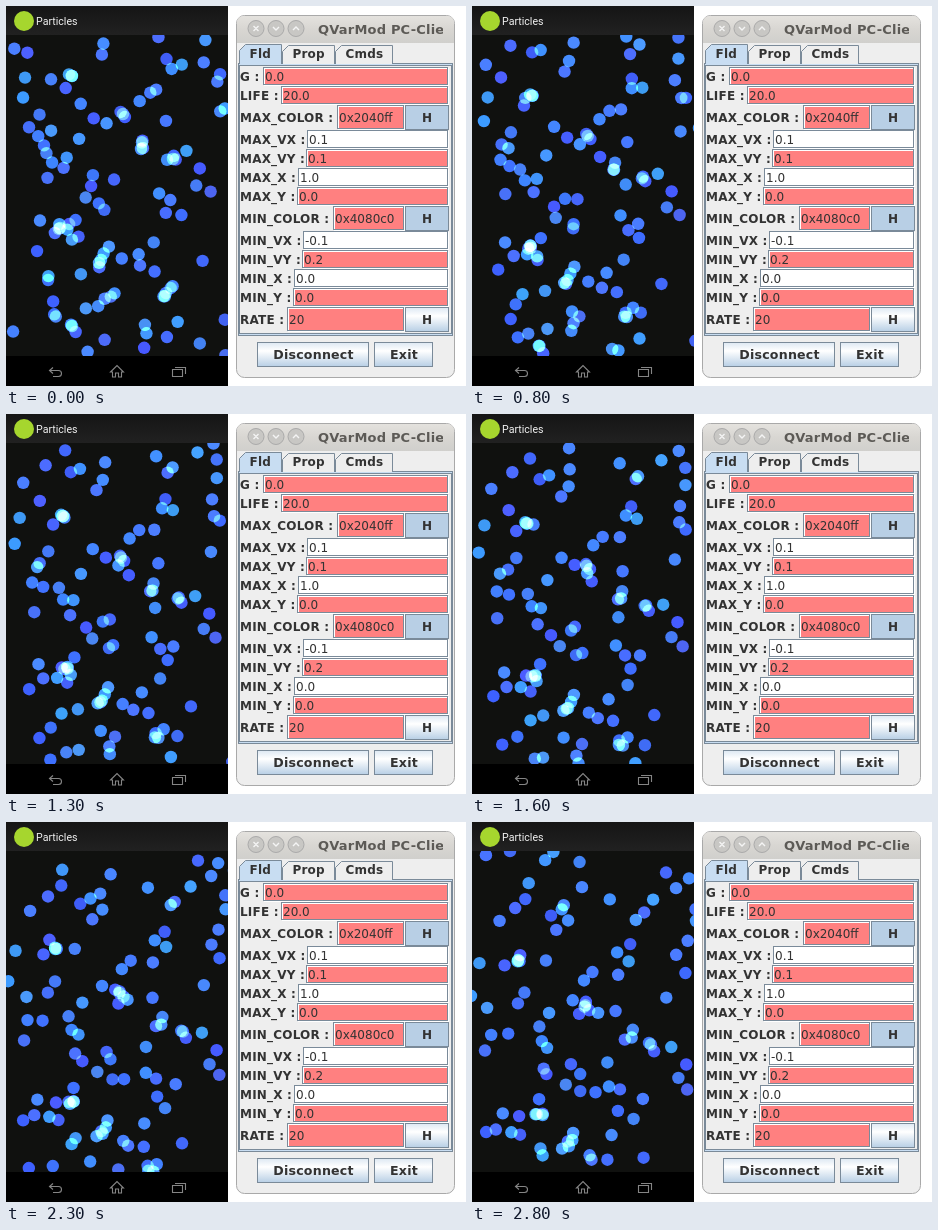
Recreate the animation shown at these times as an HTML page with a canvas. Size 460x380 px, loop 2.9 s.

```html
<!DOCTYPE html>
<html lang="en">
<head>
<meta charset="utf-8">
<title>Particles</title>
<style>
  html, body { margin: 0; width: 460px; height: 380px; overflow: hidden; background: #fff; }
  svg, canvas { position: absolute; left: 0; top: 0; display: block; }
  text { font-family: "DejaVu Sans", sans-serif; font-size: 12px; fill: #333; }
  .b { font-weight: bold; letter-spacing: .2px; }
  .push { font-size: 12.6px; }
</style>
</head>
<body>
<svg id="ui" width="460" height="380" viewBox="0 0 460 380">
  <defs>
    <linearGradient id="head" x2="0" y2="1">
      <stop offset="0" stop-color="#151515"/><stop offset="1" stop-color="#212121"/>
    </linearGradient>
    <linearGradient id="bar" x2="0" y2="1">
      <stop offset="0" stop-color="#e4e2de"/><stop offset=".5" stop-color="#d8d6d2"/><stop offset="1" stop-color="#d0cfcc"/>
    </linearGradient>
    <linearGradient id="btn" x2="0" y2="1">
      <stop offset="0" stop-color="#dde8f3"/><stop offset=".35" stop-color="#fff"/><stop offset="1" stop-color="#b8cfe5"/>
    </linearGradient>
    <clipPath id="cap"><rect x="300" y="10" width="137" height="26"/></clipPath>
  </defs>

  <rect width="222" height="380"/>
  <rect width="222" height="29" fill="url(#head)"/>
  <circle cx="18" cy="15" r="10" fill="#a6d62e"/>
  <text x="30" y="19" style="font-family:Roboto,sans-serif;font-size:10.6px;fill:#f2f2f2">Particles</text>
  <g fill="none" stroke="#858585" stroke-width="1.1">
    <path d="M47 361.5 L43.5 364.5 L47 367.5 M43.5 364.5 H52.5 Q55.5 364.5 55.5 367.5 T52.5 370.5 H47"/>
    <path d="M104.5 366 L111 359.5 L117.5 366 H115.5 V371 H112.5 V367 H109.5 V371 H106.5 V366 Z"/>
    <path d="M166.5 363.5 H176.5 V370.5 H166.5 Z M169 361.5 H179.5 V368"/>
  </g>

  <rect x="230.5" y="9.5" width="218" height="362" rx="8" fill="#eee" stroke="#a9a9a9"/>
  <path d="M231 37 V17 Q231 10 238 10 H441 Q448 10 448 17 V37 Z" fill="url(#bar)"/>
  <g fill="#c8c7c4" stroke="#aaa">
    <circle cx="250" cy="22.5" r="8"/><circle cx="270" cy="22.5" r="8"/><circle cx="290" cy="22.5" r="8"/>
  </g>
  <path d="M247.5 20 l5 5 m0 -5 l-5 5 M267 21 l3 3 l3 -3 M287 24 l3 -3 l3 3" fill="none" stroke="#f4f4f4" stroke-width="1.4"/>
  <text class="b" x="312" y="28" clip-path="url(#cap)" style="font-size:13px;fill:#5c5a56">QVarMod PC-Client</text>
</svg>
<canvas id="sky" width="222" height="321" style="top:29px"></canvas>
<script>
const ui = document.getElementById('ui');
const EDGE = '#7a8a99', PALE = '#b8cfe5', PLAIN = 'url(#btn)';

function add(tag, attrs, label) {
  const el = document.createElementNS('http://www.w3.org/2000/svg', tag);
  for (const k in attrs) el.setAttribute(k, attrs[k]);
  if (label) el.textContent = label;
  ui.append(el);
}
const box = (x, y, w, h, fill, stroke = EDGE) =>
  add('rect', { x: x + .5, y: y + .5, width: w - 1, height: h - 1, fill, stroke });
const mid = (x, y, s, cls = 'b') => add('text', { x, y, class: cls, 'text-anchor': 'middle' }, s);

function tab(x, w, label, on) {
  const y = on ? 38.5 : 39.5;
  add('path', {
    d: `M${x + .5} 58 V${y + 6} L${x + 6.5} ${y} H${x + w - .5} V58`,
    fill: on ? '#c8ddf2' : '#eee', stroke: EDGE
  });
  add('text', { x: x + 10.5, y: 52, class: 'b' }, label);
}

function button(x, w, label) {
  box(x, 336, w, 25, PLAIN);
  mid(x + w / 2 + .5, 353, label, 'b push');
}

box(232, 57, 215, 273, '#c8ddf2');
box(233, 59, 213, 269, '#eee');
tab(276, 53, 'Prop');
tab(329, 58, 'Cmds');
tab(233, 43, 'Fld', true);

// label, field left, value, highlighted, side button fill
const rows = [
  ['G', 257, '0.0', 1],
  ['LIFE', 275, '20.0', 1],
  ['MAX_COLOR', 331, '0x2040ff', 1, PALE],
  ['MAX_VX', 301, '0.1', 0],
  ['MAX_VY', 300, '0.1', 1],
  ['MAX_X', 292, '1.0', 0],
  ['MAX_Y', 291, '0.0', 1],
  ['MIN_COLOR', 327, '0x4080c0', 1, PALE],
  ['MIN_VX', 297, '-0.1', 0],
  ['MIN_VY', 296, '0.2', 1],
  ['MIN_X', 288, '0.0', 0],
  ['MIN_Y', 287, '0.0', 1],
  ['RATE', 281, '20', 1, PLAIN]
];
let y = 61;
for (const [name, x, value, hot, side] of rows) {
  const h = side ? 25 : 19, base = y + h / 2 + 4.5, right = side ? 399 : 443;
  add('text', { x: 234, y: base, class: 'b' }, name + ' :');
  box(x + 1, y + 1, right - x - 1, h - 1, hot ? '#ff8080' : '#fff', '#fff');
  box(x, y, right - x - 1, h - 1, 'none');
  add('text', { x: x + 2, y: base }, value);
  if (side) {
    box(399, y, 44, h, side);
    mid(421, base, 'H');
  }
  y += h;
}
button(251, 112, 'Disconnect');
button(368, 59, 'Exit');

// Particles fall at steady speed; additive blending lights up the overlaps
const STEP = 100, STEPS = 29, TOP = 29, BOTTOM = 350, COUNT = 118, RISE = 60;
const knots = [[95, 254], [117, 108], [135, 143], [167, 153], [54, 222], [160, 287], [66, 70], [66, 320]];

let seed = 41;
function rnd(a, b) {
  seed = (seed * 1664525 + 1013904223) % 4294967296;
  return a + (b - a) * seed / 4294967296;
}
const parts = [];
function spawn(x, y, vx, vy) {
  const [r, g, b] = [rnd(44, 62), rnd(72, 146), rnd(225, 255)].map(Math.round);
  parts.push({ x, y, vx, vy, fill: `rgb(${r},${g},${b})` });
}
for (let i = 0; i < COUNT; i++) {
  const y = BOTTOM - (i + rnd(0, 1)) / COUNT * (BOTTOM - TOP + 29 + RISE);
  spawn(rnd(2, 220), y, rnd(-11, 11), rnd(20, 31));
}
for (const [x, y] of knots) {
  const vx = rnd(-8, 8);
  for (let i = 0; i < 3; i++) spawn(x + rnd(-2, 2) * i, y + rnd(-4, 4) * i, vx + rnd(-2, 2), rnd(24, 28));
}

const ctx = document.getElementById('sky').getContext('2d');
function draw(ms) {
  const t = Math.floor(ms / STEP) % STEPS * STEP / 1000;
  ctx.globalCompositeOperation = 'source-over';
  ctx.fillStyle = '#10110f';
  ctx.fillRect(0, 0, 222, 321);
  ctx.globalCompositeOperation = 'lighter';
  for (const p of parts) {
    const x = p.x + p.vx * t, y = p.y + p.vy * t;
    if (y < TOP || y > BOTTOM) continue;
    ctx.fillStyle = p.fill;
    ctx.beginPath();
    ctx.arc(x, y - TOP, 6.2, 0, Math.PI * 2);
    ctx.fill();
  }
}

const start = performance.now();
function tick() {
  draw(performance.now() - start);
  requestAnimationFrame(tick);
}
tick();
</script>
</body>
</html>
```
